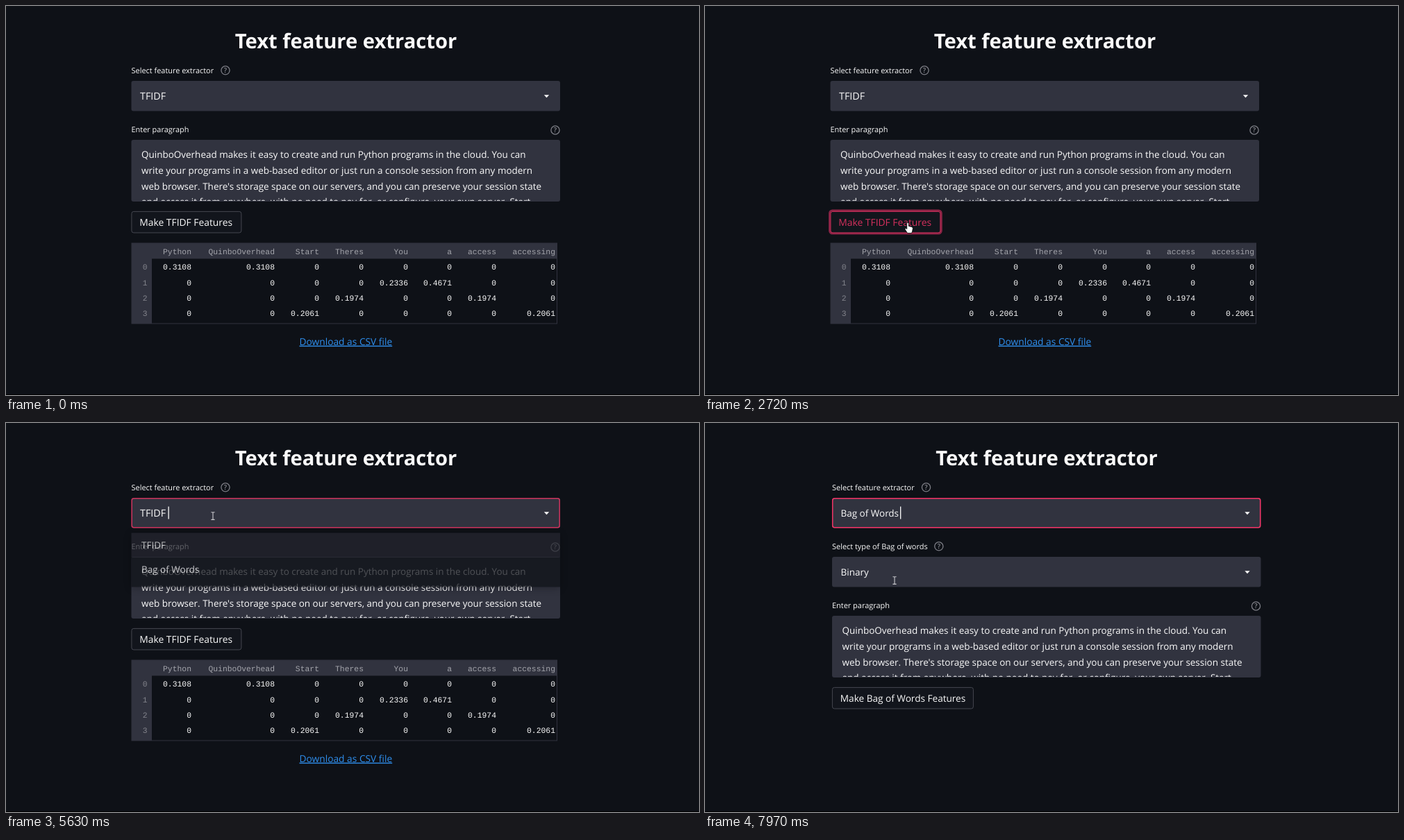
Write an HTML page that moves like this. It is 998 by 561 pixels and loops after 8000 ms.

```html
<!DOCTYPE html>
<html lang="en">
<head>
<meta charset="utf-8">
<title>Text feature extractor</title>
<style>
html, body { margin: 0; width: 100%; height: 100%; overflow: hidden; background: #0e1117; }
svg { display: block; width: 998px; height: 561px; text-rendering: geometricPrecision; }
text { font: 13.47px "Open Sans", "Noto Sans", sans-serif; fill: #fafafa; white-space: pre; }
.title { font-size: 29.2px; font-weight: 700; text-anchor: middle; }
.label { font-size: 10.95px; }
.mark { font-size: 9.5px; font-weight: 600; fill: #8a8b92; text-anchor: middle; }
.mono { font: 11.38px "Liberation Mono", monospace; text-anchor: end; }
.head { fill: #a3a4ab; }
.index { fill: #83848c; }
.link { font-size: 13.75px; fill: #2f8fee; text-decoration: underline; }
.box { fill: #31333f; }
.thumb { fill: #7f8087; }
#menu { filter: drop-shadow(0 2px 6px rgba(0, 0, 0, .35)); }
#cursor path { stroke: #000; stroke-width: .8; fill: #fff; }
#cursor .thin { fill: none; stroke: #c8c8cc; stroke-width: 1.1; }
</style>
</head>
<body>
<svg viewBox="0 0 998 561">
  <defs>
    <clipPath id="clip"><rect x="181" y="194" width="616" height="87"/></clipPath>
    <g id="help">
      <circle r="6.1" fill="none" stroke="#7d7e86" stroke-width="1.3"/>
      <text class="mark" y="3.4">?</text>
    </g>
    <g id="field">
      <rect class="box" x="180.5" width="617.5" height="43.5" rx="3"/>
      <path d="M774.8 20.3h7.4l-3.7 3.9z" fill="#fafafa"/>
    </g>
  </defs>
  <rect width="998" height="561" fill="#0e1117"/>
  <rect y="560" width="998" height="1" fill="#000"/>

  <g id="page">
    <text class="title" x="489.5" y="61.3">Text feature extractor</text>
    <text class="label" x="180.5" y="97">Select feature extractor</text>
    <use href="#help" x="316" y="92.8"/>
    <use href="#field" y="108"/>
    <rect id="focus" x="181.2" y="108.7" width="616" height="42" rx="3" fill="none" stroke="#f63366" stroke-width="1.5"/>
    <text id="value" x="193" y="134.7"></text>
    <rect id="caret" y="120.5" width="1.3" height="18" fill="#fafafa"/>

    <g id="kind">
      <text class="label" x="180.5" y="182">Select type of Bag of words</text>
      <use href="#help" x="334.3" y="177.8"/>
      <use href="#field" y="193"/>
      <text x="193" y="219.7">Binary</text>
    </g>

    <g id="body">
      <text class="label" x="180.5" y="182">Enter paragraph</text>
      <use href="#help" x="791" y="179"/>
      <rect class="box" x="180.5" y="193" width="617.5" height="89" rx="3"/>
      <g id="lines" clip-path="url(#clip)"></g>
      <rect id="scroll" class="thumb" x="791" y="194" width="5.2" height="47.5" rx="2"/>
      <rect id="ring" x="179.4" y="294.8" height="33.5" rx="4" fill="none" stroke="#8c2446" stroke-width="2.6"/>
      <rect id="button" x="180.9" y="296.4" height="30.6" rx="3" fill="#12151c"/>
      <text id="caption" y="316.7" font-size="13.85"></text>
    </g>

    <g id="table">
      <rect class="box" x="181" y="342" width="613" height="22.5"/>
      <rect class="box" x="181" y="342" width="29" height="116"/>
      <rect x="181" y="342" width="612.5" height="116" fill="none" stroke="#31333f"/>
      <rect id="slide" class="thumb" x="211" y="452" width="86" height="5" rx="2"/>
      <text class="link" x="422.5" y="488.8">Download as CSV file</text>
    </g>
  </g>

  <g id="menu">
    <rect x="180.5" y="158.5" width="617.5" height="78" fill="#0e1117"/>
    <rect id="pick" x="180.5" width="617.5" height="35.5" fill="#262730"/>
    <text x="195" y="180.8">TFIDF</text>
    <text x="195" y="216.4">Bag of Words</text>
  </g>

  <g id="cursor">
    <path id="arrow" d="M0 0V14L3.2 11L5.3 15.8L7.3 15L5.2 10.3H9.6Z"/>
    <path id="hand" d="M-1.3 1.3Q0-.8 1.3 1.3V5.4L5.5 6.4Q7.5 7 7.4 8.8L6.6 12.8L5.6 15.6H-.4L-3.9 10.2Q-4.6 8.3-2.9 8.4L-1.3 9.6Z"/>
    <path id="beam" class="thin" d="M-2.6-5.2H-.7L0-4.6L.7-5.2H2.6M0-4.6V4.8M-2.6 5.4H-.7L0 4.8L.7 5.4H2.6"/>
  </g>
</svg>
<script>
const $ = id => document.getElementById(id);
const show = (id, on) => $(id).style.display = on ? "" : "none";
const set = (id, attrs) => { for (const k in attrs) $(id).setAttribute(k, attrs[k]); };
const ramp = (t, a, b) => Math.min(1, Math.max(0, (t - a) / (b - a)));

function addText(parent, str, x, y, cls = "") {
  const el = document.createElementNS("http://www.w3.org/2000/svg", "text");
  el.setAttribute("x", x);
  el.setAttribute("y", y);
  el.setAttribute("class", cls);
  el.textContent = str;
  $(parent).append(el);
}

[
  "QuinboOverhead makes it easy to create and run Python programs in the cloud. You can",
  "write your programs in a web-based editor or just run a console session from any modern",
  "web browser. There's storage space on our servers, and you can preserve your session state",
  "and access it from anywhere, with no need to pay for, or configure, your own server. Start"
].forEach((line, i) => addText("lines", line, 195, 219.4 + i * 22.55));

// Column: heading, right edge, row of its non-zero value, value
const columns = [
  ["Python", 267, 0, "0.3108"], ["QuinboOverhead", 387, 0, "0.3108"],
  ["Start", 451, 3, "0.2061"], ["Theres", 515, 2, "0.1974"],
  ["You", 579, 1, "0.2336"], ["a", 642, 1, "0.4671"],
  ["access", 706, 2, "0.1974"], ["accessing", 791, 3, "0.2061"]
];
const rowY = r => 380.4 + r * 22.15;
for (const [name, x, row, value] of columns) {
  addText("table", name, x, 358.4, "mono head");
  for (let r = 0; r < 4; r++) addText("table", r === row ? value : "0", x, rowY(r), "mono");
}
for (let r = 0; r < 4; r++) addText("table", r, 203.5, rowY(r), "mono index");

// Pointer hot spot: time, x, y
const path = [
  [520, 824, 503], [800, 640, 452], [1080, 430, 350], [1290, 357, 283], [1360, 353, 276],
  [1560, 331, 285], [1900, 294, 311], [2040, 292, 312], [3850, 292, 312], [4060, 299, 310],
  [4260, 296, 311], [4460, 295, 309], [4740, 262, 252], [5010, 244, 201], [5220, 294, 137],
  [5290, 298, 134], [5700, 298, 134], [6050, 262, 207], [6410, 262, 207], [6820, 285, 267],
  [7170, 286, 293], [7570, 286, 293], [7970, 273, 227]
];

function pointer(t) {
  const i = path.findIndex(p => p[0] > t);
  if (i < 0) return path[path.length - 1].slice(1);
  const [a, x, y] = path[Math.max(0, i - 1)], [b, u, v] = path[i];
  const k = ramp(t, a, b);
  return [x + (u - x) * k, y + (v - y) * k];
}

function draw(t) {
  const bag = t >= 6200, wide = t >= 6960;
  const dx = wide ? 2.5 : 0, dy = wide ? 85 : 0;
  const [x, y] = pointer(t);
  const inside = (l, top, r, bottom) => t >= 520 && x >= l + dx && x <= r + dx && y >= top && y <= bottom;

  set("page", { transform: `translate(${dx})` });
  set("body", { transform: `translate(0 ${dy})` });
  show("kind", wide);
  show("table", !wide);

  const open = ramp(t, 5450, 5700) * (1 - ramp(t, 6200, 6410));
  const inMenu = open > 0 && inside(180, 158, 798, 236);
  show("menu", open > 0);
  set("menu", { opacity: open });
  set("pick", { y: inMenu && y > 194 ? 194 : 158.5 });

  $("value").textContent = bag ? "Bag of Words" : "TFIDF";
  set("value", { "font-size": 13.47 });
  $("value").style.fontSize = bag ? "" : "14.3px";
  set("focus", { opacity: ramp(t, 5330, 5710) });
  set("caret", { x: bag ? 278.5 : 233.5 });
  show("caret", t >= 5450 && Math.floor((t - 5450) / 530) % 2 === 0);

  const inArea = !inMenu && inside(180, 193 + dy, 798, 282 + dy);
  const inButton = inside(180, 296 + dy, 339, 328 + dy);
  const inSelect = inside(180, 108, 798, 152) || wide && inside(180, 193, 798, 237);
  const active = t >= 2520 && t < 5360;
  const hot = active || inButton;
  const pink = t < 3120 ? "#d5305d" : "#f23360";
  const width = wide ? 203 : 158;
  show("scroll", inArea);
  show("slide", inside(210, 342, 794, 458));
  show("ring", active);
  set("ring", { width: width + 3 });
  set("button", { width, stroke: hot ? pink : "#454750" });
  $("caption").textContent = `Make ${wide ? "Bag of Words" : "TFIDF"} Features`;
  set("caption", { x: 192.3 });
  $("caption").style.fontSize = wide ? "13.6px" : "13.85px";
  $("caption").style.fill = hot ? pink : "";

  const shape = inMenu || inButton ? "hand" : inArea || inSelect ? "beam" : "arrow";
  for (const id of ["arrow", "hand", "beam"]) show(id, id === shape);
  show("cursor", t >= 520);
  set("cursor", { transform: `translate(${x} ${y})` });
}

const start = performance.now();
function tick() {
  draw((performance.now() - start) % 8000);
  requestAnimationFrame(tick);
}
tick();
</script>
</body>
</html>
```
